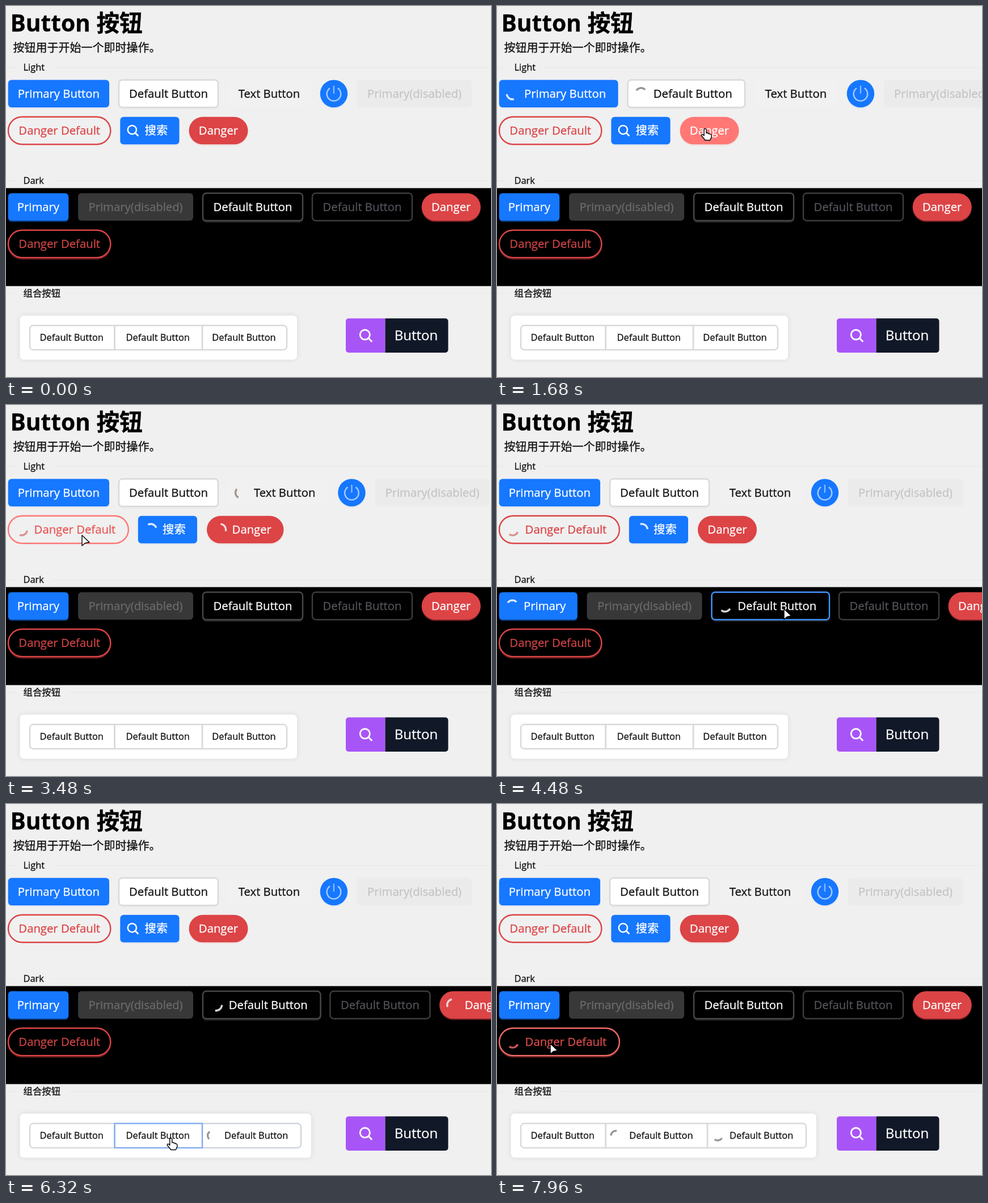
An HTML page with a canvas that plays this animation: 855x655 px, repeating every 8 s.

```html
<!DOCTYPE html>
<html lang="zh">
<head>
<meta charset="utf-8">
<title>Button 按钮</title>
<style>
  html, body { margin: 0; width: 100%; height: 100%; overflow: hidden; background: #f0f0f0; }
  canvas { display: block; }
</style>
</head>
<body>
<canvas id="stage" width="855" height="655"></canvas>
<script>
const ctx = document.getElementById('stage').getContext('2d');
const LOOP = 8000, STEP = 40, LOADING = 2000, GROW_TIME = 100, FADE = 200, SPIN_PERIOD = 960;
const FONT = '"Open Sans", "Noto Sans CJK SC", "Noto Sans CJK", "Noto Sans", sans-serif';

const STYLES = {
  primary: { fill: '#1677ff', hoverFill: '#4096ff', text: '#ffffff', spin: '#dcebff', shadow: '#dfe6f0' },
  outline: { fill: '#ffffff', border: '#d9d9d9', hoverBorder: '#4096ff', text: '#111111', spin: '#99938e', shadow: '#ebebeb' },
  plain: { fill: '#f1f1f1', hoverFill: '#e3e3e3', text: '#111111', spin: '#a8948e' },
  disabled: { fill: '#ebebeb', text: '#c5c3c3' },
  danger: { fill: '#dc4446', hoverFill: '#ff7875', text: '#ffffff', spin: '#f8dcd8', shadow: '#efe0e0' },
  dangerLine: { border: '#dc4446', hoverBorder: '#ff7875', text: '#dc4446', hoverText: '#ea5553', spin: '#d6918e' },
  darkPrimary: { fill: '#1677ff', hoverFill: '#4096ff', text: '#ffffff', spin: '#dcebff', shadow: '#0a3672' },
  darkDisabled: { fill: '#383838', text: '#6b6b6b' },
  darkOutline: { fill: '#000000', border: '#484848', hoverBorder: '#4096ff', text: '#ffffff', spin: '#d5d5d0', shadow: '#222222' },
  darkOutlineOff: { fill: '#000000', border: '#3d3d3d', text: '#55525a' },
  darkDanger: { fill: '#dc4446', hoverFill: '#ff7875', text: '#ffffff', spin: '#f0d5d3', shadow: '#701f20' },
  darkDangerLine: { fill: '#000000', border: '#dc4446', hoverBorder: '#f06a68', text: '#cf4446', hoverText: '#d94c4c', spin: '#c8585a', shadow: '#5c1a1b' },
  group: { border: '#d9d9d9', hoverBorder: '#7ba9f3', text: '#111111', spin: '#9b9492' }
};

// Each row flows to the right; click is when loading begins, phase the spinner angle at time 0.
const button = (label, style, x, w, click, phase, extra) => ({ label, style, x, w, click, phase, ...extra });
const row = (y, h, buttons, extra) => buttons.map(b => ({
  y, h, r: 6, size: 20.3, grow: 31.5, spinX: 23.5, spinR: 10, textDx: 0, ...extra, ...b
}));
const ROUND = { r: 25 };
const ROWS = [
  row(130.5, 48.5, [
    button('Primary Button', 'primary', 3.7, 178.3, 540, 215),
    button('Default Button', 'outline', 199, 175, 1200, -5),
    button('Text Button', 'plain', 391, 146, 2100, -55),
    button('', 'primary', 553.7, 48.5, null, 0, { r: 24.25, icon: 'power' }),
    button('Primary(disabled)', 'disabled', 619, 202)
  ]),
  row(195.8, 48.5, [
    button('Danger Default', 'dangerLine', 4, 180.3, 3260, -165, ROUND),
    button('搜索', 'primary', 201.3, 104.2, 2840, 65, { icon: 'search', grow: 0, spinX: 22.5, textDx: 11.5 }),
    button('Danger', 'danger', 322.5, 104, 1730, 100, ROUND)
  ]),
  row(330.5, 48.5, [
    button('Primary', 'darkPrimary', 3.7, 106.5, 3880, 25),
    button('Primary(disabled)', 'darkDisabled', 127, 203),
    button('Default Button', 'darkOutline', 347, 176, 4370, -160),
    button('Default Button', 'darkOutlineOff', 540, 176),
    button('Danger', 'darkDanger', 732.7, 104, 4820, 0, ROUND)
  ]),
  row(395.8, 48.5, [button('Danger Default', 'darkDangerLine', 4, 180.3, 7810, -30, ROUND)]),
  row(564, 43, [
    button('Default Button', 'group', 42, 149.5, null, 0, { r: [6, 0, 0, 6] }),
    button('Default Button', 'group', 191.5, 154.5, 6380, 125, { r: 0 }),
    button('Default Button', 'group', 346, 149, 6000, -25, { r: [0, 6, 6, 0] })
  ], { size: 16.4, grow: 25, spinX: 18, spinR: 8.5, textDx: -1 })
];

// Pointer stops: time, x, y.
const PATH = [
  [80, 330, 608], [480, 110, 165], [640, 110, 165], [1140, 352, 160], [1300, 357, 163],
  [1600, 367, 216], [1760, 367, 217], [2040, 495, 162], [2200, 490, 166], [2640, 303, 213],
  [2780, 262, 216], [2880, 258, 217], [3220, 140, 224], [3480, 134, 230], [3800, 80, 354],
  [3920, 84, 356], [4320, 500, 356], [4480, 506, 360], [4760, 830, 356], [4880, 830, 358],
  [5080, 780, 478], [5720, 425, 592], [6040, 418, 590], [6240, 292, 590], [6420, 289, 590],
  [6720, 118, 588], [7420, 115, 588], [7720, 98, 422], [7960, 94, 423]
];

const clamp = v => Math.max(0, Math.min(1, v));
const ease = v => { v = clamp(v); return v * v * (3 - 2 * v); };

function mix(from, to, amount) {
  if (!to || !amount) return from;
  const channel = (hex, i) => parseInt(hex.slice(i, i + 2), 16);
  return 'rgb(' + [1, 3, 5].map(i => Math.round(channel(from, i) + (channel(to, i) - channel(from, i)) * amount)) + ')';
}

function cursorAt(t) {
  if (t < PATH[0][0]) return null;
  const next = PATH.findIndex(p => p[0] > t);
  if (next < 0) return PATH[PATH.length - 1].slice(1);
  const [t0, x0, y0] = PATH[next - 1], [t1, x1, y1] = PATH[next];
  const k = ease((t - t0) / (t1 - t0));
  return [x0 + (x1 - x0) * k, y0 + (y1 - y0) * k];
}

const inside = (b, p) => p && p[0] >= b.left && p[0] <= b.left + b.width && p[1] >= b.y && p[1] <= b.y + b.h;

// Share of the recent past that the pointer spent on the button, which gives a fade.
function hoverAmount(b, t) {
  const samples = 10;
  let hits = 0;
  for (let i = 0; i < samples; i++) if (inside(b, cursorAt(t - i * FADE / samples))) hits++;
  return hits / samples;
}

function loadAmount(b, t) {
  if (!b.click) return 0;
  return ease((t - b.click) / GROW_TIME) - ease((t - b.click - LOADING) / GROW_TIME);
}

function layout(buttons, t) {
  let shift = 0;
  return buttons.map(b => {
    const load = loadAmount(b, t), growth = b.grow * load;
    const placed = { ...b, load, left: b.x + shift, width: b.w + growth, textShift: growth * 0.865 };
    shift += growth;
    placed.hover = hoverAmount(placed, t);
    return placed;
  });
}

// A hairline stroke gives the letters a slightly sturdier weight.
function text(str, x, y, size, color, align = 'left', weight = 400) {
  ctx.font = `${weight} ${size}px ${FONT}`;
  ctx.textAlign = align;
  ctx.fillStyle = ctx.strokeStyle = color;
  ctx.lineWidth = 0.3;
  ctx.fillText(str, x, y);
  ctx.strokeText(str, x, y);
}

function box(x, y, w, h, r, fill, stroke, lineWidth = 2.4) {
  ctx.beginPath();
  ctx.roundRect(x, y, w, h, r);
  if (fill) { ctx.fillStyle = fill; ctx.fill(); }
  if (stroke) { ctx.strokeStyle = stroke; ctx.lineWidth = lineWidth; ctx.stroke(); }
}

function arc(x, y, r, from, to, color, lineWidth) {
  ctx.beginPath();
  ctx.arc(x, y, r, from, to);
  ctx.strokeStyle = color;
  ctx.lineWidth = lineWidth;
  ctx.stroke();
}

function line(x0, y0, x1, y1, color, lineWidth) {
  ctx.beginPath();
  ctx.moveTo(x0, y0);
  ctx.lineTo(x1, y1);
  ctx.strokeStyle = color;
  ctx.lineWidth = lineWidth;
  ctx.stroke();
}

function searchIcon(x, y, scale) {
  arc(x - 1.5 * scale, y - 1.5 * scale, 7.6 * scale, 0, 2 * Math.PI, '#fff', 2.5 * scale);
  line(x + 4 * scale, y + 4 * scale, x + 9.5 * scale, y + 9.5 * scale, '#fff', 2.7 * scale);
}

function powerIcon(x, y) {
  arc(x, y + 0.5, 12.3, -Math.PI * 0.31, Math.PI * 1.31, '#a3caff', 2.5);
  line(x, y - 14, x, y, '#8abaff', 2.4);
}

function drawButton(b, t) {
  const s = STYLES[b.style], cy = b.y + b.h / 2;
  if (s.shadow) box(b.left, b.y + 2.3, b.width, b.h, b.r, !s.border && s.shadow, s.border && s.shadow);
  box(b.left, b.y, b.width, b.h, b.r, s.fill && mix(s.fill, s.hoverFill, b.hover),
    s.border && mix(s.border, s.hoverBorder, b.hover));

  if (b.icon === 'power') powerIcon(b.left + b.width / 2, cy);
  if (b.icon === 'search') {
    ctx.globalAlpha = 1 - b.load;
    searchIcon(b.left + b.spinX, cy, 1);
  }
  if (b.load > 0) {
    const mid = (b.phase + 360 * t / SPIN_PERIOD) * Math.PI / 180, half = Math.PI * 0.28;
    ctx.globalAlpha = b.load;
    arc(b.left + b.spinX, cy, b.spinR, mid - half, mid + half, s.spin, 3.3);
  }
  ctx.globalAlpha = 1;
  text(b.label, b.left + b.w / 2 + b.textShift + b.textDx, cy + b.size * 0.35,
    b.size, mix(s.text, s.hoverText, b.hover), 'center');
}

function section(label, y, lineStart) {
  line(0, y, 18, y, '#e7e7e7', 1);
  line(lineStart, y, 855, y, '#e7e7e7', 1);
  text(label, 30.5, y + 5.8, 16.4, '#111');
}

function drawCursor([x, y], isHand) {
  const shape = new Path2D(isHand
    ? 'M-2 1.5Q0-1.5 2 1.5V8Q4.5 6.5 5.5 9Q8 8 8.5 10Q11 9.5 11 12V15Q10 18 8.5 20.5H0Q-2.5 17-6.5 12.5Q-7 9.5-4 10.5L-2 12.5Z'
    : 'M0 0V18.5L5.5 13.8L13 12.5Z');
  ctx.save();
  ctx.translate(x, y);
  ctx.fillStyle = '#fff';
  ctx.strokeStyle = '#000';
  ctx.lineWidth = 1.4;
  ctx.lineJoin = 'round';
  ctx.fill(shape);
  ctx.stroke(shape);
  ctx.restore();
}

function draw(t) {
  ctx.fillStyle = '#f0f0f0';
  ctx.fillRect(0, 0, 855, 655);
  text('Button 按钮', 7.5, 45, 40.7, '#000', 'left', 700);
  text('按钮用于开始一个即时操作。', 12.5, 80.5, 20, '#111');
  section('Light', 108.5, 84);
  section('Dark', 308.5, 80);
  section('组合按钮', 507.5, 110);
  ctx.fillStyle = '#000';
  ctx.fillRect(0, 321.5, 855, 173);

  const rows = ROWS.map(buttons => layout(buttons, t));
  const group = rows[4], last = group[2];
  ctx.save();
  ctx.shadowColor = 'rgba(0,0,0,.1)';
  ctx.shadowBlur = 10;
  box(24.5, 546.5, last.left + last.width - 6.5, 78, 7, '#fff');
  ctx.restore();
  // Hovered segments go on top so that their outline covers the shared edges.
  group.sort((a, b) => a.hover - b.hover);
  rows.flat().forEach(b => drawButton(b, t));

  box(599, 551.5, 69.5, 60.5, [5, 0, 0, 5], '#a855f7');
  box(668.5, 551.5, 111, 60.5, [0, 5, 5, 0], '#111827');
  searchIcon(634.5, 582, 1.13);
  text('Button', 723, 590, 24, '#fff', 'center');

  const cursor = cursorAt(t);
  if (cursor) {
    const over = rows.flat().find(b => inside(b, cursor));
    drawCursor(cursor, over && !over.load && 'spin' in STYLES[over.style]);
  }
}

const start = performance.now();
function frame() {
  const t = (performance.now() - start) % LOOP;
  draw(Math.floor(t / STEP) * STEP);
  requestAnimationFrame(frame);
}
frame();
</script>
</body>
</html>
```
